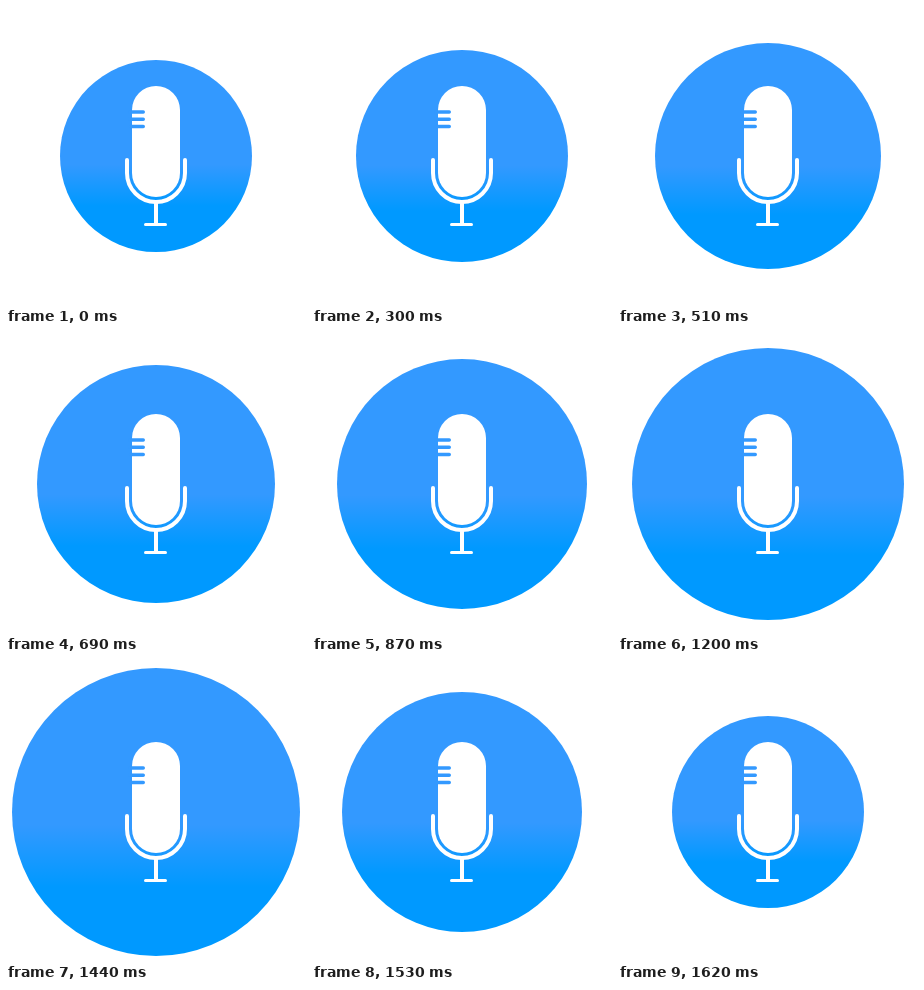
Animation of 300x300 px, one loop 1.65 s. Source, as an HTML page:

```html
<!DOCTYPE html>
<html lang="en">
<head>
<meta charset="utf-8">
<title>Microphone pulse</title>
<style>
  html, body { margin: 0; width: 100%; height: 100%; overflow: hidden; background: #fff; }
  svg { display: block; width: 300px; height: 300px; }
</style>
</head>
<body>
<svg viewBox="0 0 300 300">
  <defs>
    <linearGradient id="blue" x1="0" y1="0" x2="0" y2="1">
      <stop offset=".545" stop-color="#39f"/>
      <stop offset=".76" stop-color="#09f"/>
    </linearGradient>
  </defs>
  <circle id="disc" cx="150" cy="150" r="96" fill="url(#blue)"/>
  <rect x="126" y="80" width="48" height="111" rx="24" fill="#fff"/>
  <path d="M124 106H137.3M124 113.2H137.3M124 120.5H137.3"
        fill="none" stroke="#39f" stroke-width="3.4" stroke-linecap="round"/>
  <g fill="none" stroke="#fff" stroke-linecap="round">
    <path d="M121 154V167A29 29 0 0 0 179 167V154" stroke-width="4"/>
    <path d="M150 197V218" stroke-width="4" stroke-linecap="butt"/>
    <path d="M139.5 218.5H159.5" stroke-width="3"/>
  </g>
</svg>
<script>
  const disc = document.getElementById('disc');
  const LOOP = 1650, STEP = 30, MIN = 96, GROW = 48, SHRINK = 6;
  const start = performance.now();

  // Grows 1px per step, then falls back 8px per step and rests briefly.
  function radius(step) {
    if (step <= GROW) return MIN + step;
    return MIN + GROW * Math.max(0, 1 - (step - GROW) / SHRINK);
  }

  function draw(now) {
    const t = Math.max(0, now - start) % LOOP;
    disc.setAttribute('r', radius(Math.floor(t / STEP)));
    requestAnimationFrame(draw);
  }
  requestAnimationFrame(draw);
</script>
</body>
</html>
```
